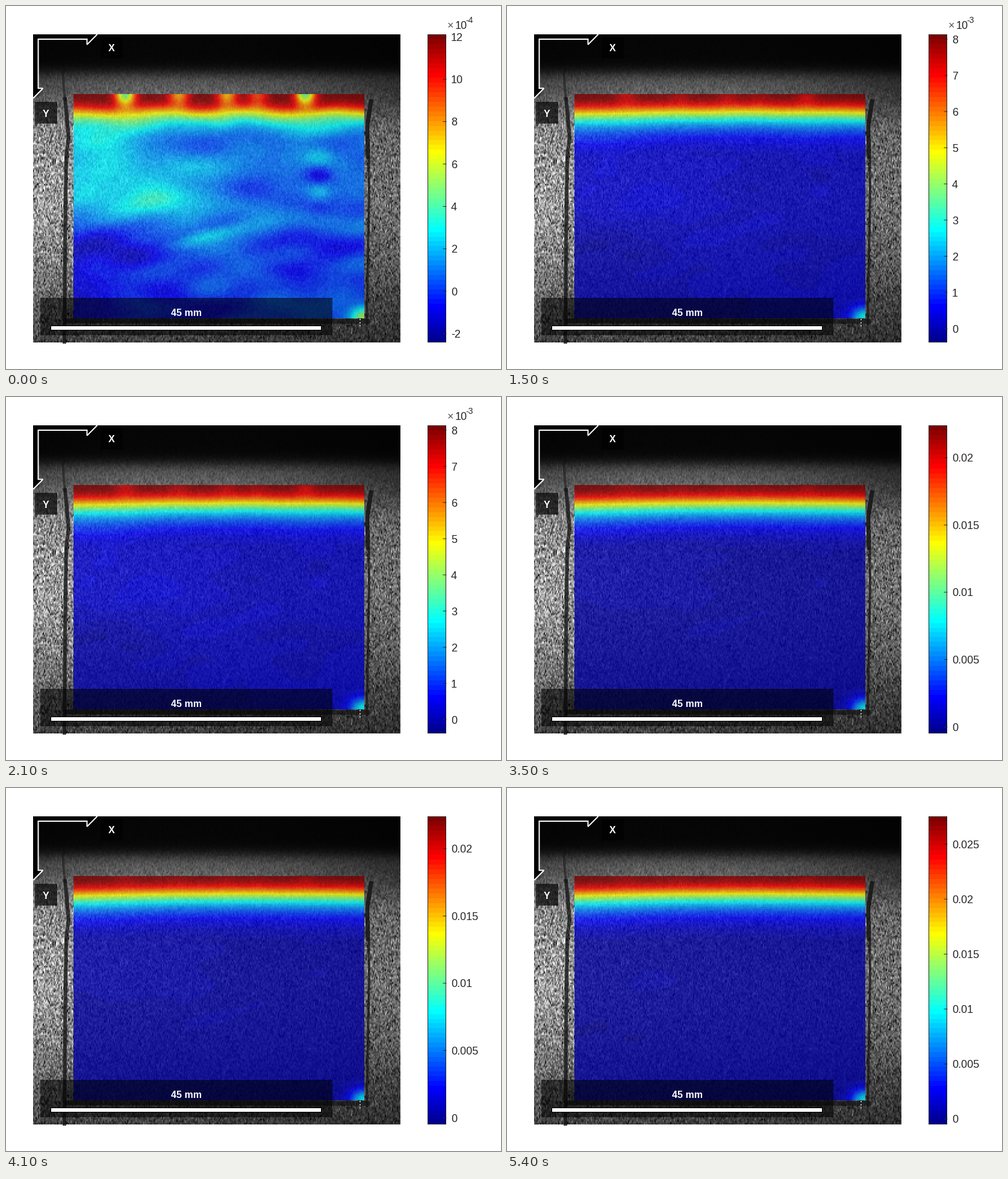
A matplotlib script for the animation above (6 s loop, 822 by 602 pixels).

```python
import math

import numpy as np
import matplotlib.pyplot as plt
from matplotlib.animation import FuncAnimation
from matplotlib.patches import Polygon, Rectangle

WIDTH, HEIGHT, DPI = 822, 602, 64
PT = 72 / DPI  # points per pixel
INK = "#262626"
plt.rcParams["font.family"] = "Liberation Sans"

# Colour scale of each load step: low, high, tick step, power of ten
SCALES = [
    (-2.4, 12.1, 2, -4),
    (-.29, 3.295, .5, -3),
    (-.375, 8.125, 1, -3),
    (-.355, 15.39, 5, -3),
    (-.00047, .02238, .005, 0),
    (-.00047, .0275, .005, 0),
]


def pixel_grid(left, right, top, bottom):
    return np.meshgrid(np.arange(left, right) + .5, np.arange(top, bottom) + .5)


def bell(d, spread):
    return np.exp(-(d / spread) ** 2)


def step_up(d, width):
    return 1 / (1 + np.exp(-d / width))


def jet(v):
    """Classic 64-step rainbow from dark blue to dark red."""
    v = (np.floor(np.clip(v, 0, .999) * 64) + 1) / 64
    return np.clip(1.5 - abs(4 * v[..., None] - np.array([3, 2, 1])), 0, 1)


def speckled_plate():
    x, y = pixel_grid(45, 655, 47, 558)
    rng = np.random.default_rng(4)
    dots = rng.normal(size=(256, 305))
    dots = (dots + np.roll(dots, 1, 0)) / math.sqrt(2)
    dots = dots.repeat(2, 0).repeat(2, 1)[:511]
    light = 6 + 128 * bell(y - 300, 270) * step_up(y - 112, 6)
    light *= 1.18 - .4 * (x - 45) / 610
    light *= 1 - .35 * ((x - 350) / 305) ** 2 * np.clip((200 - y) / 60, 0, 1)
    grain = .1 + .18 * np.clip((y - 130) / 90, 0, 1)
    gray = light * (1 + grain * (dots + .3 * rng.normal(size=x.shape)))
    return np.clip(gray, 0, 255) / 255


def mottle(x, y, waves=40):
    """Smooth random patches, stretched along a slight upward slope."""
    rng = np.random.default_rng(11)
    u, v = x - .2 * y, y + .2 * x
    total = sum(np.cos(u * rng.normal(0, 1 / 40) + v * rng.normal(0, 1 / 16)
                       + rng.uniform(0, math.tau)) for _ in range(waves))
    return total / math.sqrt(waves / 2)


def excess_strain(x, y):
    across = (x - 112) / 483
    upper = .12 - .08 * across
    lower = -.06 + .07 * across
    field = lower + (upper - lower) * step_up(360 + 30 * across - y, 10)
    field += .05 * bell(x - 210, 130) * bell(y - 305, 50)
    field += .15 * bell(x - 335, 65) * bell(y - 382 + .25 * (x - 335), 13)
    field += .09 * bell(x - 436, 40) * bell(y - 452, 16)
    field += .08 * bell(x - 360, 26) * bell(y - 191, 14)
    # Alternating spots in the upper right
    field += .13 * bell(x - 520, 22) * bell(y - 290, 50) * np.cos((y - 247) * math.tau / 64)
    return field + .03 * mottle(x, y)


def strain_levels(low, high, share):
    """Strain as 0..1 on the scale; share is how much the fine detail counts."""
    x, y = pixel_grid(112, 595, 146, 518)
    level = -low / (high - low) + .004 + share * excess_strain(x, y)
    depth = y - 140 - 4 * (1 - share) * ((x - 400) / 290) ** 2
    depth -= share * (2 * np.sin(x / 23) + 3 * bell(x - 505, 35))
    band = 1.05 / (1 + (np.maximum(depth, 0) / (42 - 3 * share)) ** (3 + share)) - .05
    level += (1 - level) * np.maximum(band, 0)
    for center, drop in [(198, .52), (287, .3), (367, .32), (418, .2), (497, .52)]:
        level -= share * drop * bell(x - center, 17) * bell(y - 146, 20)
    return level + .34 * bell(595 - x, 24) * bell(518 - y, 19)


def blended_maps(gray):
    spans = [(high - low) * 10.0 ** power for low, high, _, power in SCALES]
    for (low, high, *_), span in zip(SCALES, spans):
        color = jet(strain_levels(low, high, spans[0] / span))
        yield .79 * color + .21 * gray[..., None]


fig = plt.figure(figsize=(WIDTH / DPI, HEIGHT / DPI), dpi=DPI, facecolor="white")
ax = fig.add_axes([0, 0, 1, 1])


def picture(data, left, right, top, bottom, **style):
    return ax.imshow(data, extent=(left, right, bottom, top), aspect="auto",
                     interpolation="nearest", **style)


def box(left, top, right, bottom, **style):
    ax.add_patch(Rectangle((left, top), right - left, bottom - top,
                           snap=False, **style))


def label(x, y, text, size, **style):
    return ax.text(x, y, text, fontsize=size * PT, va="baseline", **style)


def stroke(points, width, color="#141414", **style):
    return ax.plot(*zip(*points), color=color, lw=width * PT, snap=False, **style)[0]


plate = speckled_plate()
picture(plate, 45, 655, 47, 558, cmap="gray", vmin=0, vmax=1)

# Hand-drawn outline of the specimen
stroke([(94, 108), (98, 156)], 4, alpha=.5)
stroke([(98, 154), (104, 218), (100, 250), (98, 400), (97, 557)], 6, alpha=.8)
stroke([(606, 158), (600, 200), (601, 250)], 7, alpha=.85)
stroke([(602, 250), (603, 300), (599, 528)], 4, alpha=.75)
stroke([(101, 522), (600, 523)], 8, alpha=.7)
stroke([(588, 519), (588, 531)], 2, color="#c8c8c8", ls=":")

maps = list(blended_maps(plate[99:471, 67:550]))
heat = picture(maps[0], 112, 595, 146, 518, zorder=3)

# Axis corner
tail = [(45, 153), (61.5, 136.5), (53.5, 136.5)]
corner = [(53.5, 55), (134.5, 55), (134.5, 64), (151.5, 47)]
ax.add_patch(Polygon([(45, 47)] + tail + corner, color="black", lw=0, zorder=4))
stroke(tail + corner, 2, color="white", zorder=5, solid_joinstyle="miter",
       solid_capstyle="butt")
box(157, 51, 194, 87, color="black", alpha=.6, lw=0, zorder=4)
box(48, 159, 85, 195, color="black", alpha=.65, lw=0, zorder=4)

# Length scale
box(57, 484, 542, 546, color="black", alpha=.55, lw=0, zorder=4)
box(74.5, 530.5, 523.5, 537.5, fc="white", ec="black", lw=PT, zorder=5)
for x, y, text in [(175, 75, "X"), (66.5, 184, "Y"), (299, 514, "45 mm")]:
    label(x, y, text, 16, color="white", weight="bold", ha="center", zorder=6)

# Colour scale
picture(jet(np.linspace(1, 0, 510))[:, None], 700, 731, 47, 558)
box(700.5, 47.5, 730.5, 557.5, fill=False, ec=INK, lw=PT, zorder=5)
factor = [label(732.5, 38, "×", 18, color="#555555"),
          label(745.5, 38, "10", 18, color=INK),
          label(763.5, 28, "", 14, color=INK)]
marks = [(stroke([(726, 0), (731, 0)], 1, color=INK, zorder=6),
          label(739, 0, "", 18, color=INK)) for _ in range(9)]

ax.set(xlim=(0, WIDTH), ylim=(HEIGHT, 0))
ax.axis("off")


def update(frame):
    index = min((frame + 1) // 2, len(SCALES) - 1)
    low, high, step, power = SCALES[index]
    heat.set_data(maps[index])
    factor[-1].set_text(str(power))
    for part in factor:
        part.set_visible(power != 0)
    for n, (tick, text) in enumerate(marks, math.ceil(low / step)):
        value = n * step
        y = 557.5 - 510 * (value - low) / (high - low)
        tick.set_ydata([y, y])
        text.set_position((739, y + 6.5))
        text.set_text(f"{value:g}")
        for part in (tick, text):
            part.set_visible(value <= high)
    return [heat]


anim = FuncAnimation(fig, update, frames=12, interval=500, repeat=True,
                     repeat_delay=0, blit=False)
plt.show()
```
